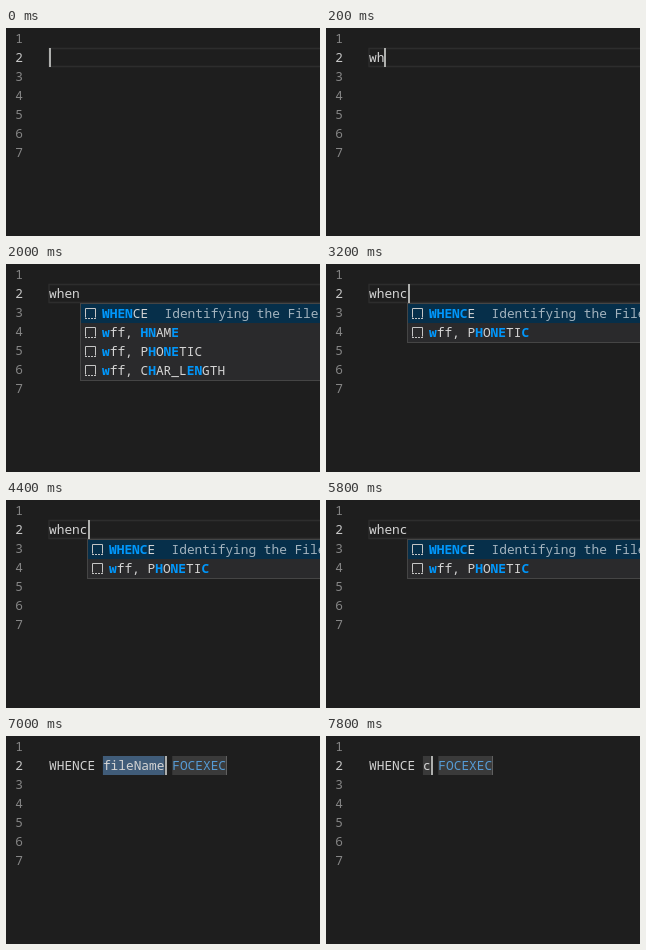
An HTML page that plays this animation: 314x208 px, repeating every 8000 ms.

```html
<!DOCTYPE html>
<html lang="en">
<head>
<meta charset="utf-8">
<title>Code completion</title>
<style>
html, body { margin: 0; width: 100%; height: 100%; overflow: hidden; background: #1e1e1e; }
svg { display: block; width: 314px; height: 208px; }
text { font: 12.83px "Noto Sans Mono", "DejaVu Sans Mono", monospace; fill: #d4d4d4; white-space: pre; }
.num { fill: #858585; }
.now { fill: #c6c6c6; }
.hit { fill: #0097fb; font-weight: bold; }
.detail { fill: #a3b3be; }
.keyword { fill: #569cd6; }
.icon { fill: none; stroke: #c5c5c5; }
</style>
</head>
<body>
<svg viewBox="0 0 314 208"></svg>
<script>
const LOOP = 8000, CHAR = 7.7, LEFT = 43, PITCH = 19;
const svg = document.querySelector('svg');

const rect = (x, y, w, h, fill, extra = '') =>
  `<rect x="${x}" y="${y}" width="${w}" height="${h}" fill="${fill}" ${extra}/>`;
const text = (x, y, s, cls = '') => `<text x="${x}" y="${y}" class="${cls}">${s}</text>`;
const column = n => LEFT + n * CHAR;

// Matched letters are wrapped in square brackets.
const lists = {
  when: ['[WHEN]CE', '[w]ff, [HN]AM[E]', '[w]ff, P[H]O[NE]TIC', '[w]ff, C[H]AR_L[EN]GTH'],
  whenc: ['[WHENC]E', '[w]ff, P[H]O[NE]TI[C]']
};
const mark = s => s.replace(/\[(.*?)\]/g, '<tspan class="hit">$1</tspan>');

// Start time, typed text or snippet argument
const edits = [[0, ''], [200, 'wh'], [400, 'when'], [3200, 'whenc'], [6000, 'fileName'], [7600, 'c']];
// Times at which the cursor switches, starting visible
const blinks = [1000, 1400, 2000, 2400, 3000, 3200, 3800, 4200, 4800, 5200, 5800, 6000, 6400, 7000, 7400, 7600];

const gutter = [1, 2, 3, 4, 5, 6, 7]
  .map(n => text(9.2, 15 + (n - 1) * PITCH, n, n === 2 ? 'now' : 'num')).join('');

function popup(word) {
  const rows = lists[word];
  if (!rows) return '';
  const x = 74.5 + (word.length - 4) * 7;
  const box = rect(x, 39.5, 300, rows.length * PITCH + 1, '#2a2a2c', 'stroke="#454545"') +
    rect(x + .5, 40, 300, PITCH, '#062f4a');
  const items = rows.map((row, i) => {
    const y = 40 + i * PITCH;
    return `<path class="icon" d="M${x + 5} ${y + 13.5}v-9h10v9"/>` +
      `<path class="icon" stroke-dasharray="2 1" d="M${x + 4.5} ${y + 14.5}h11"/>` +
      text(x + 21.5, y + 14, mark(row));
  }).join('');
  return box + items + text(x + 84, 54, 'Identifying the Files', 'detail');
}

function snippet(arg) {
  const start = column(7), width = arg.length * CHAR, next = start + width + CHAR;
  const end = next + 7 * CHAR;
  return rect(start, 20, width, PITCH, arg === 'fileName' ? '#405c79' : '#3a3a3a') +
    rect(next, 20, 7 * CHAR, PITCH, '#3a3a3a') +
    rect(Math.round(end), 20, 1, PITCH, '#606060') +
    text(LEFT, 34, 'WHENCE') + text(start, 34, arg) + text(next, 34, 'FOCEXEC', 'keyword');
}

function scene(t) {
  const [since, word] = edits.filter(e => e[0] <= t).pop();
  const filled = since >= 6000;
  const line = filled
    ? snippet(word)
    : rect(LEFT, 20.5, 300, 18, 'none', 'stroke="#2d2d2d" stroke-width="1.5"') +
      text(LEFT, 34, word) + popup(word);
  const visible = blinks.filter(b => b <= t).length % 2 === 0;
  const x = Math.round(column(word.length + (filled ? 7 : 0)));
  return gutter + line + (visible ? rect(x, 20, 2, PITCH, '#aeafad') : '');
}

let shown;
function draw(now) {
  const next = scene(now % LOOP);
  if (next !== shown) svg.innerHTML = shown = next;
  requestAnimationFrame(draw);
}
draw(0);
</script>
</body>
</html>
```
